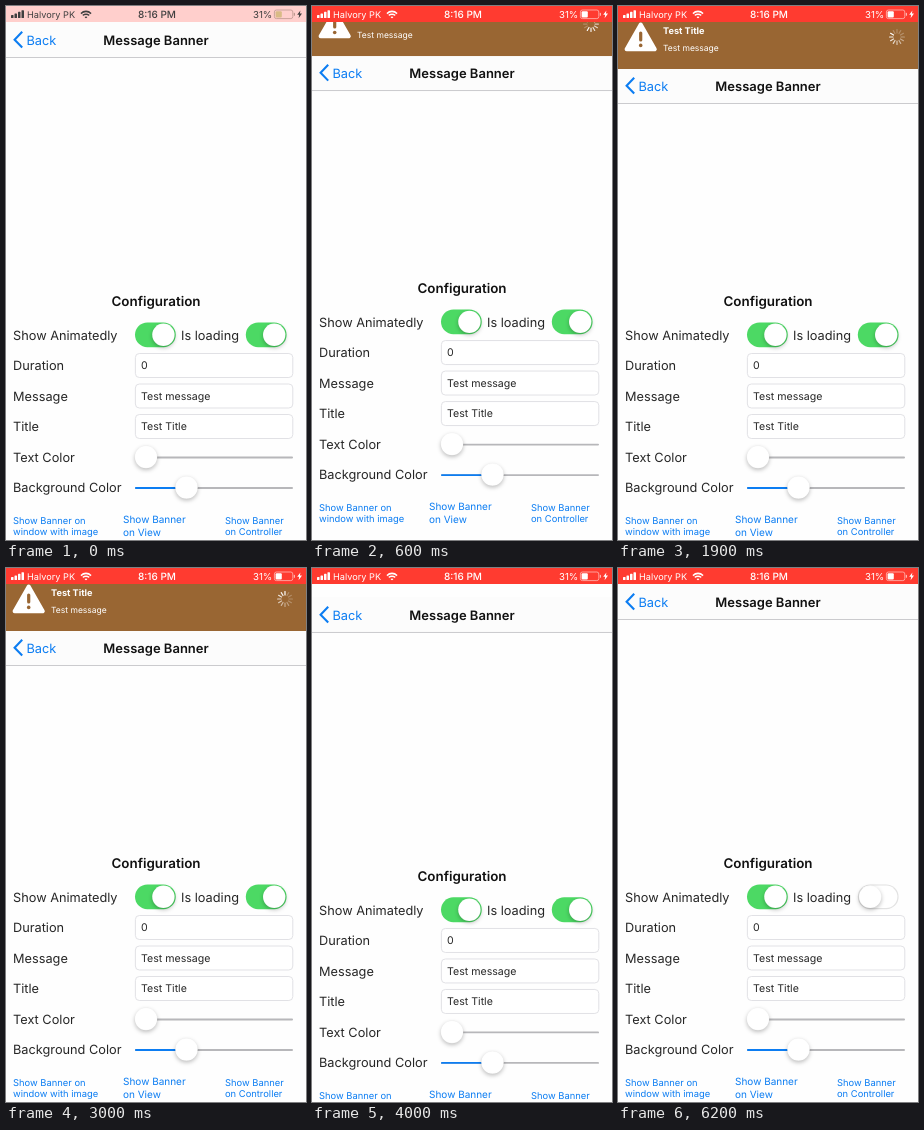
Write an HTML page with a canvas that moves like this. It is 300x534 px and loops after 8000 ms.

```html
<!DOCTYPE html>
<html lang="en">
<head>
<meta charset="utf-8">
<title>Message Banner</title>
<style>
  html, body { margin: 0; width: 100%; height: 100%; overflow: hidden; background: #fff; }
  canvas { display: block; width: 300px; height: 534px; }
</style>
</head>
<body>
<canvas id="stage"></canvas>
<script>
const W = 300, H = 534, LOOP = 8000;
const BANNER = 46, BAR = 16;
const BLUE = [12, 125, 242], GREEN = [76, 217, 100], RED = [255, 59, 48];
const WHITE = [255, 255, 255], BLACK = [0, 0, 0], INK = '#262626';

const canvas = document.getElementById('stage');
const ctx = canvas.getContext('2d');
const dpr = window.devicePixelRatio || 1;
canvas.width = W * dpr;
canvas.height = H * dpr;
ctx.textRendering = 'geometricPrecision';

const rgb = c => `rgb(${c.map(Math.round).join(',')})`;
const mix = (a, b, p) => rgb(a.map((v, i) => v + (b[i] - v) * p));

// Eased progress of a move that begins at start and takes span ms
function ease(t, start, span) {
  const x = Math.min(1, Math.max(0, (t - start) / span));
  return x * x * (3 - 2 * x);
}

// y is the middle of the capital letters
function text(s, x, y, size, color = INK, weight = 400, align = 'left') {
  ctx.font = `${weight} ${size}px Inter, "Open Sans", sans-serif`;
  ctx.textAlign = align;
  ctx.fillStyle = color;
  ctx.fillText(s, x, y + size * 0.36);
}

function pill(x, y, w, h, r, color) {
  ctx.fillStyle = color;
  ctx.beginPath();
  ctx.roundRect(x, y, w, h, r);
  ctx.fill();
}

function line(points, width, color) {
  ctx.strokeStyle = color;
  ctx.lineWidth = width;
  ctx.beginPath();
  points.forEach(([x, y]) => ctx.lineTo(x, y));
  ctx.stroke();
}

function knob(x, y, w, h) {
  ctx.save();
  ctx.shadowColor = 'rgba(0,0,0,.26)';
  ctx.shadowBlur = 4 * dpr;
  ctx.shadowOffsetY = 1.8 * dpr;
  pill(x, y, w, h, h / 2, '#fff');
  ctx.restore();
  ctx.strokeStyle = 'rgba(0,0,0,.04)';
  ctx.lineWidth = 0.5;
  ctx.stroke();
}

function toggle(x, y, off, stretch) {
  const w = 40.8, h = 24.8, d = 22.4;
  pill(x, y, w, h, h / 2, mix(GREEN, [226, 226, 226], off));
  if (off > 0) {
    const iw = (w - 2.4) * off, ih = (h - 2.4) * off;
    pill(x + (w - iw) / 2, y + (h - ih) / 2, iw, ih, ih / 2, '#fff');
  }
  const kw = d + 5 * stretch;
  const right = x + w - 1.2 - kw;
  knob(right + (x + 1.2 - right) * off, y + 1.2, kw, d);
}

function field(y, value) {
  ctx.strokeStyle = '#dedee2';
  ctx.lineWidth = 0.9;
  ctx.fillStyle = '#fff';
  ctx.beginPath();
  ctx.roundRect(129.4, y - 12, 157.4, 24, 4);
  ctx.fill();
  ctx.stroke();
  text(value, 135, y, 10.6);
}

function slider(y, x) {
  pill(129, y - 0.4, 158, 1.8, 0.9, '#b7b7ba');
  if (x > 141) pill(129, y - 0.4, x - 129, 1.8, 0.9, rgb(BLUE));
  knob(x - 11.2, y - 11.2, 22.4, 22.4);
}

function link(x, y, size, gap, lines) {
  lines.forEach((s, i) => text(s, x, y + i * gap, size, rgb(BLUE)));
}

function content(t) {
  text('Configuration', 150, 295, 13.4, '#111', 600, 'center');
  const labels = ['Show Animatedly', 'Duration', 'Message', 'Title', 'Text Color', 'Background Color'];
  labels.forEach((s, i) => text(s, 7, 329 + i * 30.5, 12.75));
  text('Is loading', 175, 329, 12.75);

  toggle(129, 316.4, 0, 0);
  toggle(239.8, 316.4, ease(t, 5800, 280), ease(t, 5550, 200) - ease(t, 5980, 220));

  field(359.5, '0');
  field(390, 'Test message');
  field(420.5, 'Test Title');
  slider(451, 140);
  slider(481.5, 180.5);

  link(7, 514.5, 9.4, 11.5, ['Show Banner on', 'window with image']);
  link(117, 513.5, 10, 12.5, ['Show Banner', 'on View']);
  link(219, 514.5, 9.4, 11.5, ['Show Banner', 'on Controller']);
}

function navBar() {
  ctx.fillStyle = '#fcfcfc';
  ctx.fillRect(0, BAR, W, 35);
  ctx.fillStyle = '#cbcbce';
  ctx.fillRect(0, 51, W, 1);
  ctx.lineJoin = 'miter';
  line([[16.2, 25.8], [8.6, 33.7], [16.2, 41.6]], 2.1, rgb(BLUE));
  text('Back', 20.5, 34, 12.8, rgb(BLUE));
  text('Message Banner', 150, 34, 13, '#111', 600, 'center');
}

function spinner(x, y, t) {
  const step = Math.floor(t * 12 / 1000);
  ctx.lineCap = 'round';
  for (let i = 0; i < 12; i++) {
    const a = i * Math.PI / 6 - Math.PI / 2;
    const age = (((step - i) % 12) + 12) % 12;
    const c = Math.cos(a), s = Math.sin(a);
    line([[x + c * 4, y + s * 4], [x + c * 7.4, y + s * 7.4]], 1.2,
      `rgba(255,255,255,${Math.max(0.25, 1 - age * 0.09)})`);
  }
  ctx.lineCap = 'butt';
}

function banner(t) {
  const brown = '#996633';
  ctx.fillStyle = brown;
  ctx.fillRect(0, BAR, W, BANNER + 1);

  ctx.fillStyle = ctx.strokeStyle = '#fff';
  ctx.lineWidth = 4;
  ctx.lineJoin = 'round';
  ctx.beginPath();
  ctx.moveTo(22.7, 18.6);
  ctx.lineTo(36.8, 43.2);
  ctx.lineTo(8.6, 43.2);
  ctx.closePath();
  ctx.fill();
  ctx.stroke();
  pill(21.1, 25.5, 3.2, 10, 1.6, brown);
  pill(20.9, 37.6, 3.6, 3.6, 1.8, brown);

  text('Test Title', 45, 24.5, 9.2, '#fff', 700);
  text('Test message', 45, 42, 8.5, '#fff');
  spinner(279, 31, t);
}

function statusBar(t) {
  const p = ease(t, -112, 350);
  const ink = mix(BLACK, WHITE, p);
  ctx.fillStyle = mix(WHITE, RED, p);
  ctx.fillRect(0, 0, W, BAR);

  for (let i = 0; i < 4; i++) {
    const h = 3 + i * 1.6;
    pill(5 + i * 3.5, 12 - h, 2.5, h, 0.6, ink);
  }
  text('Halvory PK', 21, 8.2, 9.2, ink);

  ctx.save();
  ctx.beginPath();
  ctx.moveTo(80, 12.4);
  ctx.arc(80, 12.4, 10, -Math.PI * 0.76, -Math.PI * 0.24);
  ctx.clip();
  ctx.strokeStyle = ink;
  ctx.lineWidth = 1.6;
  for (const r of [1.2, 4.2, 7]) {
    ctx.beginPath();
    ctx.arc(80, 12.4, r, Math.PI, Math.PI * 2);
    ctx.stroke();
  }
  ctx.restore();

  text('8:16 PM', 151, 8.2, 10, ink, 500, 'center');
  text('31%', 247, 8.2, 9.6, ink);

  ctx.strokeStyle = mix([165, 140, 130], [255, 185, 180], p);
  ctx.lineWidth = 0.8;
  ctx.beginPath();
  ctx.roundRect(268.4, 4, 18.4, 8.6, 2);
  ctx.stroke();
  pill(269.6, 5.2, 6.2, 6.2, 1, mix([205, 165, 95], WHITE, p));
  pill(287.8, 6.8, 1.2, 3, 0.6, ctx.strokeStyle);

  ctx.fillStyle = ink;
  ctx.beginPath();
  [[294.4, 4.4], [291.2, 8.8], [293.2, 8.8], [292.6, 12.2], [296, 7.6], [293.9, 7.6]]
    .forEach(([x, y]) => ctx.lineTo(x, y));
  ctx.fill();
}

function shifted(dy, paint) {
  ctx.save();
  ctx.translate(0, dy);
  paint();
  ctx.restore();
}

function draw(t) {
  const show = ease(t, 406, 300), hide = ease(t, 3806, 300);
  const visible = t > 406 && t < 3806;
  const drop = BANNER * (show - hide);

  ctx.setTransform(dpr, 0, 0, dpr, 0, 0);
  ctx.fillStyle = '#fefefe';
  ctx.fillRect(0, 0, W, H);

  // The page is laid out at its new height first, then slides
  shifted(visible ? drop - BANNER : drop, () => content(t));
  shifted(drop, navBar);
  if (visible) shifted(drop - BANNER, () => banner(t));
  statusBar(t);
}

const begin = performance.now();
function tick() {
  draw((performance.now() - begin) % LOOP);
  requestAnimationFrame(tick);
}
tick();
</script>
</body>
</html>
```
